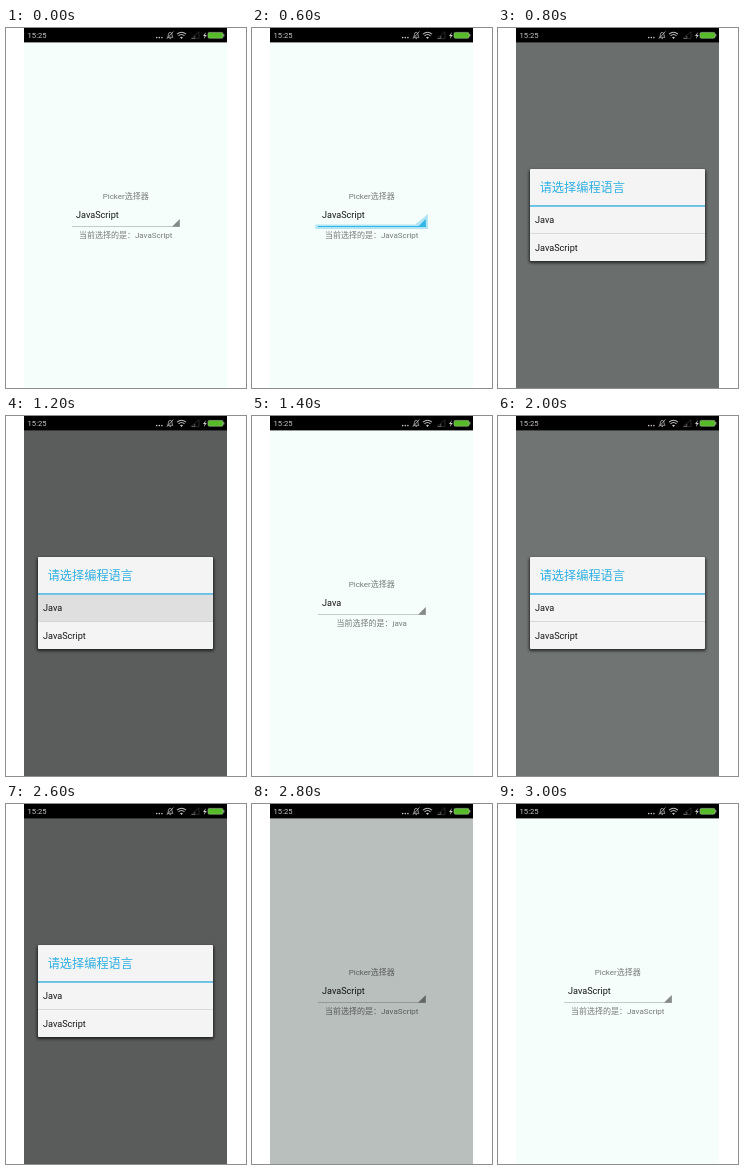
These frames come from a looping animation (240 px wide and 360 px high, 4.8 s). An HTML page:

```html
<!DOCTYPE html>
<html lang="zh">
<head>
<meta charset="utf-8">
<style>
  html, body { margin: 0; width: 100%; height: 100%; overflow: hidden; background: #fff; }
  svg { display: block; width: 100vw; height: 100vh; }
  text { font-family: Roboto, "Noto Sans CJK SC", "Noto Sans CJK", sans-serif; }
  .label { font-size: 8px; fill: #777b7a; text-anchor: middle; }
  .item { font-size: 9.1px; fill: #151515; }
</style>
</head>
<body>
<svg viewBox="0 0 240 360">
  <defs>
    <filter id="soft" x="-10%" y="-10%" width="120%" height="125%">
      <feGaussianBlur stdDeviation="1.6"/>
    </filter>
  </defs>

  <rect x="18" width="203" height="360" fill="#f5fefb"/>

  <g id="page">
    <text class="label" x="119.7" y="171">Picker选择器</text>
    <text class="item" id="value" x="70" y="190.3"></text>
    <g id="glow" fill="#33b5e5" opacity=".35">
      <path d="M63.5 196.5H163L176 186V201H63.5Z"/>
    </g>
    <rect id="line" x="66" y="198" width="108" height="1"/>
    <path id="corner" d="M173.8 191V198.7H166Z"/>
    <text class="label" id="status" x="119.7" y="209.8"></text>
  </g>

  <rect id="dim" x="18" y="14" width="203" height="346"/>

  <g id="dialog">
    <rect x="31" y="142" width="177" height="93" rx="2" fill="#000" opacity=".65" filter="url(#soft)"/>
    <rect x="32" y="141" width="175" height="92" rx="1" fill="#f4f4f4"/>
    <rect id="press" x="32" y="179" width="175" height="27" fill="#dfdfdf"/>
    <rect x="32" y="177.2" width="175" height="1.5" fill="#45b4de"/>
    <rect x="32" y="205.2" width="175" height=".8" fill="#d3d3d3"/>
    <text x="41.7" y="163.9" font-size="12.2" fill="#33b0e0">请选择编程语言</text>
    <text class="item" x="37" y="195.2">Java</text>
    <text class="item" x="37" y="222.8">JavaScript</text>
  </g>

  <rect x="18" width="203" height="14.4" fill="#000"/>
  <g fill="#c9c9c9">
    <text x="21.6" y="10.4" font-size="7.6">15:25</text>
    <circle cx="150.7" cy="9.6" r=".8"/>
    <circle cx="153.3" cy="9.6" r=".8"/>
    <circle cx="155.9" cy="9.6" r=".8"/>
    <path d="M174 9.2L175.5 11L177 9.2Q175.5 8.2 174 9.2Z"/>
    <path d="M200 4L197 8H198.7L197.8 11L200.8 7H199Z"/>
  </g>
  <g fill="none" stroke="#b9b9b9" stroke-width=".8">
    <path d="M161.4 9.3Q162.4 8.5 162.4 6.6Q162.4 4.4 164.2 4.4Q166 4.4 166 6.6Q166 8.5 167 9.3ZM163.5 10.6H165M160.8 10.8L167.4 3.5"/>
    <path d="M171 6.2Q175.5 2.2 180 6.2M172.5 7.9Q175.5 5.2 178.5 7.9" stroke-width="1.1"/>
    <path d="M185 10.6L193 3.8V10.6Z" stroke="#343434"/>
    <path d="M185.8 10.4H188.8V8" stroke="#777"/>
  </g>
  <rect x="202" y="4.4" width="15" height="5.8" rx="1.3" fill="#55bb26" stroke="#a2bb95" stroke-width=".6"/>
  <rect x="217.3" y="6" width="1" height="2.6" fill="#a2bb95"/>
</svg>

<script>
const LOOP = 4800;
const byId = id => document.getElementById(id);
const show = (id, on) => byId(id).setAttribute("visibility", on ? "visible" : "hidden");
const within = (t, from, to) => t >= from && t < to;

// [start time, backdrop opacity]
const dimSteps = [
  [0, 0], [800, .563], [1000, .63], [1400, 0],
  [2000, .54], [2200, .635], [2800, .25], [3000, 0]
];

function draw(t) {
  const java = within(t, 1400, 2800);
  const pressed = within(t, 600, 800) || within(t, 1800, 2000);
  const open = within(t, 800, 1400) || within(t, 2000, 2800);
  const dim = dimSteps.filter(step => step[0] <= t).pop()[1];

  byId("value").textContent = java ? "Java" : "JavaScript";
  byId("status").textContent = "当前选择的是：" + (java ? "java" : "JavaScript");
  byId("line").setAttribute("fill", pressed ? "#33b5e5" : "#c5cbc9");
  byId("corner").setAttribute("fill", pressed ? "#33b5e5" : "#858987");
  byId("dim").setAttribute("opacity", dim);
  show("glow", pressed);
  show("page", !open);
  show("dialog", open);
  show("press", within(t, 1200, 1400));
  if (!pressed || open) show("glow", false);
}

const start = performance.now();
function tick() {
  draw((performance.now() - start) % LOOP);
  requestAnimationFrame(tick);
}
tick();
</script>
</body>
</html>
```
